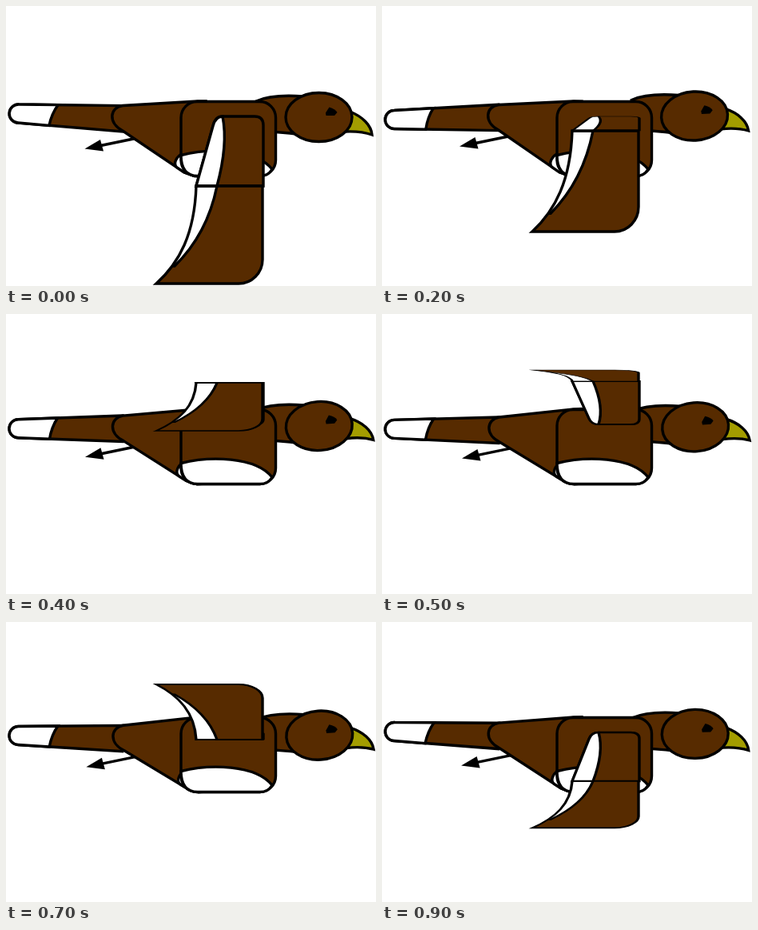
Animation, 463 px wide and 350 px high, one loop 1000 ms. Source, as an HTML page:

```html
<!DOCTYPE html>
<html lang="en">
<head>
<meta charset="utf-8">
<title>Flapping bird</title>
<style>
  html, body { margin: 0; width: 100%; height: 100%; overflow: hidden; background: #fff; }
  svg { display: block; width: 463px; height: 350px; }
  .line { stroke: #000; stroke-width: 3.4; }
  .brown { fill: #572b00; }
  .white { fill: #fff; }
  .beak { fill: #a39d00; }
  .none { fill: none; }
</style>
</head>
<body>
<svg viewBox="0 0 463 350">
  <defs>
    <path id="feathers" d="M238 0H321V92A30 30 0 0 1 291 122H188C217 96 236 60 238 0Z"/>
    <clipPath id="edge"><use href="#feathers"/></clipPath>
  </defs>
  <g id="leg">
    <path class="line none" d="M162 165.500L116 175"/>
    <path d="M98.500 178.500L118 167L122 181.500Z"/>
  </g>
  <g id="tail">
    <path class="line brown" d="M146 -16.200L15.500 -11.500A11.500 11.500 0 0 0 15.500 11.500L146 16.200Z"/>
    <path class="line white" d="M64.500 -13.300L15.500 -11.500A11.500 11.500 0 0 0 15.500 11.500L54.500 13Q57 -2 64.500 -13.300Z"/>
  </g>
  <g id="rump">
    <path class="line brown" d="M240 119L146 124.500C130 126.500 127 146 146 156L223 208L236 212.500H250V119Z"/>
    <path class="line white" d="M214 202C208 197 214 187 222 184H240V212.500H236L223 208Z"/>
  </g>
  <path id="neck" class="line brown" d="M313 119C324 114 345 111 372 113V161L355 159L330 157Z"/>
  <rect class="line brown" x="219" y="119.500" width="118.500" height="93" rx="20"/>
  <path class="line white" d="M219 186.500C255 177.500 312 178 333 204Q328 212.500 318 212.500H240Q219 212.500 219 186.500Z"/>
  <g id="head">
    <path class="line beak" d="M430 132C446 138 457 149 458 161Q444 156 424 157Z"/>
    <ellipse class="line brown" cx="391.500" cy="139" rx="41.500" ry="30.500"/>
    <path d="M400 133.500L404.500 126.500Q412 128.500 414.500 133L411 137L400.500 137Z"/>
  </g>
  <g id="inner">
    <path class="line brown" d="M238 87L259 12Q262 0 272 0H311Q322 0 322 11V87Z"/>
    <path class="line white" d="M238 87L259 12Q262 0 271 0C277 30 270 65 264 87Z"/>
  </g>
  <g id="outer">
    <use href="#feathers" class="brown"/>
    <path class="line white" clip-path="url(#edge)" d="M264 0Q252 60 211 100H180V0Z"/>
    <use href="#feathers" class="line none"/>
  </g>
</svg>
<script>
const LOOP = 1000, STEPS = 10;
const SHOULDER = 138, INNER = 87, OUTER = 122;

const deg = rad => rad * 180 / Math.PI;
const put = (id, value) => document.getElementById(id).setAttribute("transform", value);

// Linear track through [time, value] keys, closing on its first value.
function track(...keys) {
  keys.push([1, keys[0][1]]);
  return p => {
    const i = keys.findIndex(key => key[0] > p);
    const [t0, v0] = keys[i - 1], [t1, v1] = keys[i];
    return v0 + (v1 - v0) * (p - t0) / (t1 - t0);
  };
}

// The body rests, lifts on the downstroke and sinks on the upstroke.
const sway = (rest, lift, sink) => track([0, rest], [0.2, lift], [0.6, sink]);

const elbow = track([0, 225], [0.2, 156], [0.3, 88], [0.5, 84], [0.7, 147]);
const tip = track([0, 347], [0.2, 282], [0.3, 222], [0.5, 70], [0.6, 3], [0.7, 78]);
const tailEnd = sway(134.5, 142, 144.5);
const tailRoot = sway(140.5, 139.5, 147);
const legX = sway(0, -1.5, 2.5);
const legY = sway(0, -3, 3.5);
const nod = sway(0, -1.5, 3.5);
const tilt = sway(0, -3, -5);

function draw(p) {
  const bend = elbow(p), root = tailRoot(p), dip = nod(p);
  put("inner", `translate(0 ${SHOULDER}) scale(1 ${(bend - SHOULDER) / INNER})`);
  put("outer", `translate(0 ${bend}) scale(1 ${(tip(p) - bend) / OUTER})`);
  put("tail", `translate(0 ${root}) rotate(${deg(Math.atan((root - tailEnd(p)) / 125))} 140 0)`);
  put("rump", `rotate(${-deg((root - 140.5) / 95)} 238 119)`);
  put("leg", `translate(${legX(p)} ${legY(p)})`);
  put("neck", `translate(${dip * 0.4} ${dip})`);
  put("head", `translate(${dip * 0.3} ${dip}) rotate(${tilt(p)} 391.5 139)`);
}

const start = performance.now();
function tick() {
  const t = Math.max(0, performance.now() - start) % LOOP;
  draw(Math.floor(t / LOOP * STEPS) / STEPS);
  requestAnimationFrame(tick);
}
tick();
</script>
</body>
</html>
```
